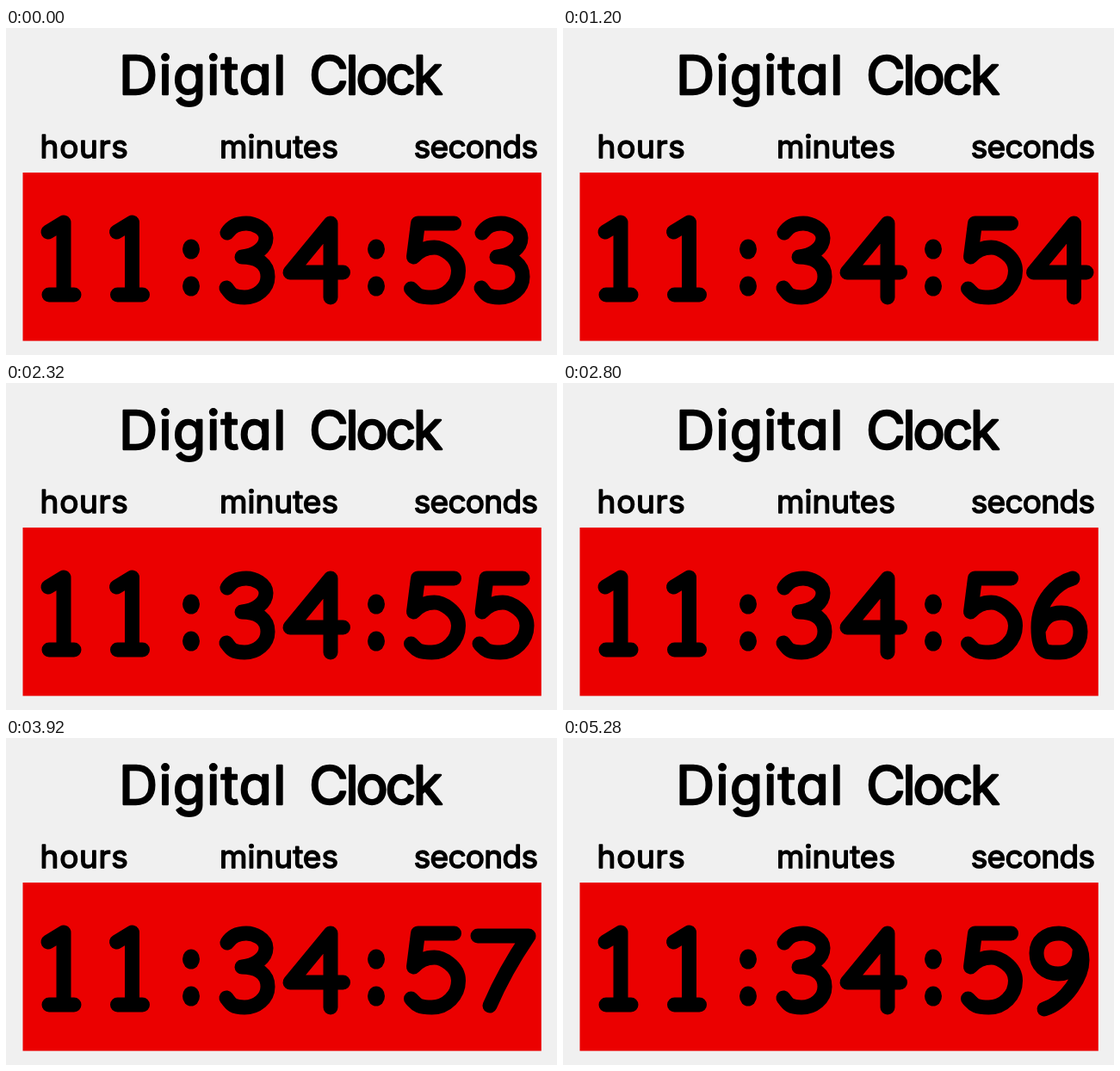
These frames come from a looping animation (640x380 px, 5360 ms). An HTML page with a canvas:

```html
<!DOCTYPE html>
<html lang="en">
<head>
<meta charset="utf-8">
<title>Digital Clock</title>
<style>
  html, body { margin: 0; width: 100%; height: 100%; overflow: hidden; background: #f0f0f0; }
  canvas, svg { position: absolute; left: 0; top: 0; display: block; }
  text {
    font-family: "Comic Sans MS", Inter, "Open Sans", sans-serif;
    font-weight: 400;
    font-feature-settings: "cv11";
    font-optical-sizing: none;
    text-anchor: middle;
    fill: #000;
    stroke: #000;
    stroke-linejoin: round;
  }
  .title { font-size: 62px; stroke-width: 2.4px; }
  .label { font-size: 37px; stroke-width: 1.5px; }
</style>
</head>
<body>
<canvas id="face" width="640" height="380" role="img"></canvas>
<svg width="640" height="380" viewBox="0 0 640 380">
  <text class="title" x="229" y="77" letter-spacing="1.4">Digital</text>
  <text class="title" x="428.2" y="77" letter-spacing="-3">Clock</text>
  <text class="label" x="91" y="151" letter-spacing=".7">hours</text>
  <text class="label" x="317" y="151">minutes</text>
  <text class="label" x="545.5" y="151" letter-spacing="-.7">seconds</text>
</svg>
<script>
const LOOP = 5360;
const TICK = 800;
const FIRST_SECOND = 53;
const CELLS = [25, 104.5, 240, 319.5, 456.5, 536];
const COLONS = [215, 430];

// Pen strokes of each figure, relative to the left edge of its cell
const figures = {
  1: "M24 237L42 226V310M25 310H54",
  3: "M17 238C22 230 30 227 39 227S62 233 62 244 50 265 34 266C53 266 64 275 64 289S51 313 37 313 21 309 16 302",
  4: "M57.5 313V227L10.5 284H72",
  5: "M64 227H22L17 266C24 258 32 255 41 255S69 265 69 282 55 313 38 313 20 309 14 303",
  6: "M56 227C38 232 16 252 16 284S26 313 41 313 65 303 65 289 56 267 43 267 22 273 18 284",
  7: "M12 230H71C54 255 38 283 26 311",
  8: "M40 227a22 19 0 1 0 .1 0ZM40 265a26 24 0 1 0 .1 0Z",
  9: "M64 248C64 263 54 274 39 274S14 264 14 250 25 227 40 227 67 240 67 258 50 306 23 315"
};

const strokes = {};
for (const key in figures) strokes[key] = new Path2D(figures[key]);

const face = document.getElementById("face");
const ctx = face.getContext("2d");
ctx.lineWidth = 17;
ctx.lineCap = ctx.lineJoin = "round";
ctx.strokeStyle = "#000";

function drawFigure(figure, x) {
  ctx.save();
  ctx.translate(x, 0);
  ctx.stroke(strokes[figure]);
  ctx.restore();
}

function drawDot(x, y) {
  ctx.beginPath();
  ctx.ellipse(x, y, 10, 11.5, 0, 0, Math.PI * 2);
  ctx.fill();
}

function drawClock(second) {
  ctx.fillStyle = "#f0f0f0";
  ctx.fillRect(0, 0, 640, 380);
  ctx.fillStyle = "#eb0000";
  ctx.fillRect(19.5, 168, 602.3, 195.6);
  ctx.fillStyle = "#000";
  [..."1134" + second].forEach((figure, i) => drawFigure(figure, CELLS[i]));
  for (const x of COLONS) {
    drawDot(x, 257);
    drawDot(x, 300);
  }
  face.setAttribute("aria-label", "11:34:" + second);
}

let shown;
function tick() {
  const second = FIRST_SECOND + Math.floor(performance.now() % LOOP / TICK);
  if (second !== shown) {
    shown = second;
    drawClock(second);
  }
  requestAnimationFrame(tick);
}
tick();
</script>
</body>
</html>
```
